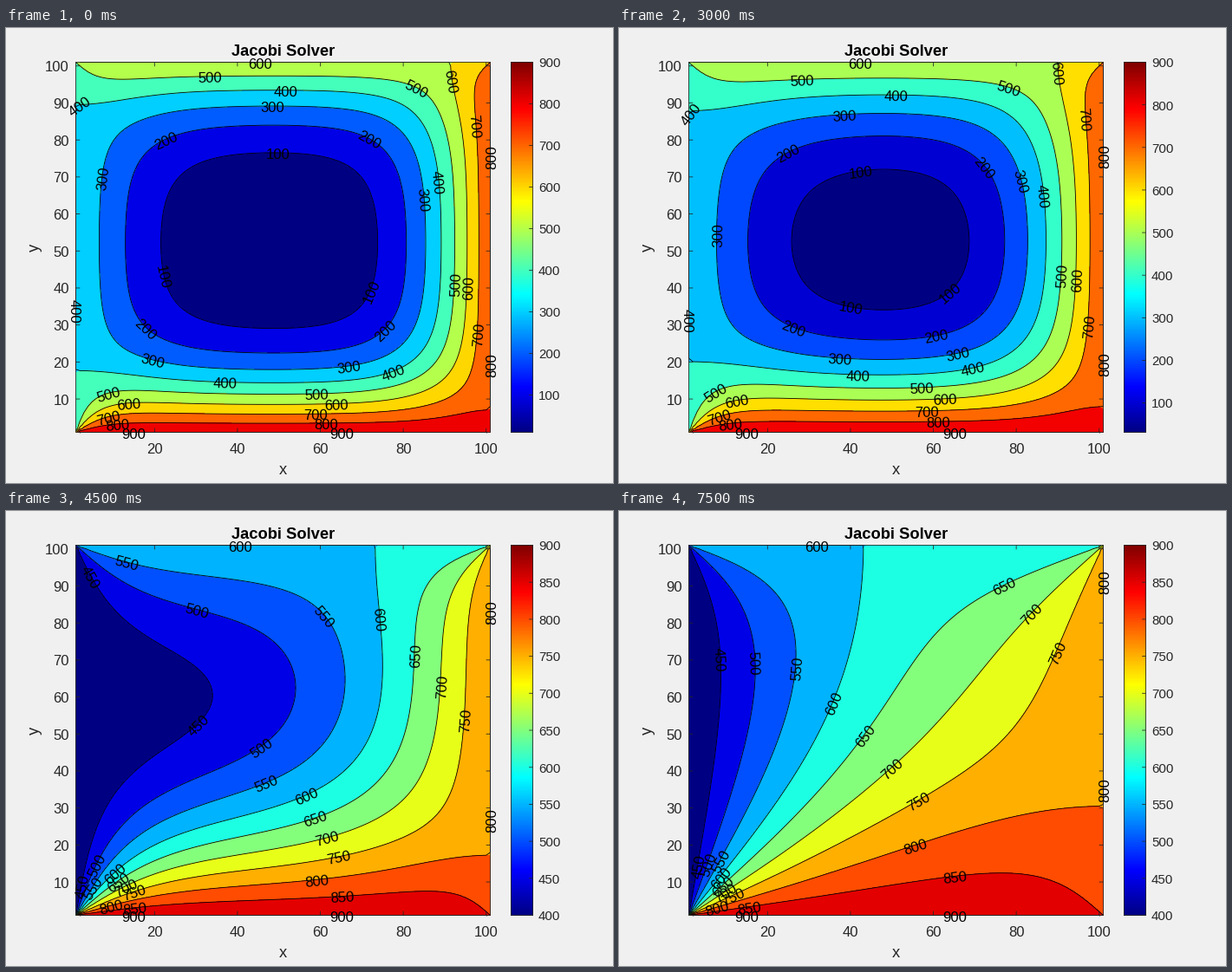
Write a matplotlib script that moves like this. It is 700x525 px and loops after 8000 ms.

```python
import math

import numpy as np
import matplotlib.pyplot as plt
from matplotlib.animation import FuncAnimation

W, H = 700, 525
LEFT, RIGHT, TOP, BOTTOM = 80.5, 558.5, 39.5, 466.5
BAR_L, BAR_R = 582.5, 607.5
N = 101
DX, DY = (RIGHT - LEFT) / (N - 1), (BOTTOM - TOP) / (N - 1)
GRAY = "#262626"
PT = 0.72  # points per pixel at 100 dpi
LINE = 0.83 * PT
SPACING, LABEL, SHIFT = 240, 28, 0.195  # contour label layout in pixels

# Jacobi sweeps completed at each displayed step
SWEEPS = [605, 607, 610, 616, 627, 668, 795, 1037, 1800, 3750,
          5800, 7850, 10000, 12200, 14400, 16600]

plt.rcParams["font.family"] = "Liberation Sans"


def px(x):
    return LEFT + (x - 1) * DX


def py(y):
    return BOTTOM - (y - 1) * DY


def solve():
    u = np.zeros((N, N))
    u[:, 0], u[:, -1], u[-1], u[0] = 400, 800, 600, 900
    u[0, 0], u[0, -1], u[-1, 0], u[-1, -1] = 650, 850, 500, 700
    states, done = [], 0
    for target in SWEEPS:
        for _ in range(target - done):
            u[1:-1, 1:-1] = 0.25 * (u[:-2, 1:-1] + u[2:, 1:-1]
                                    + u[1:-1, :-2] + u[1:-1, 2:])
        done = target
        states.append(u.copy())
    return states


def jet(n=256):
    x = np.arange(1, n + 1)[:, None] / n
    return np.clip(1.5 - np.abs(4 * x - np.array([3, 2, 1])), 0, 1)


def nice_step(span):
    base = 10 ** math.floor(math.log10(span))
    ratio = span / base
    if ratio < 1.2:
        return base / 10
    if ratio < 2.4:
        return base / 5
    return base / 2 if ratio < 6 else base


STATES = solve()
JET = jet()
GX, GY = np.meshgrid(px(np.arange(1, N + 1)), py(np.arange(1, N + 1)))

fig = plt.figure(figsize=(W / 100, H / 100), dpi=100, facecolor="#f0f0f0")
ax = fig.add_axes([0, 0, 1, 1])


def write(x, y, s, size, angle=0, ha="center", color=GRAY, mid=0.358, **kw):
    """Place text so that a point mid * size above its baseline is at (x, y)."""
    a, drop = math.radians(angle), mid * size
    ax.text(x + drop * math.sin(a), y + drop * math.cos(a), s,
            fontsize=size * PT, rotation=angle, rotation_mode="anchor",
            ha=ha, va="baseline", color=color, zorder=6, **kw)


def stroke(xs, ys):
    ax.plot(xs, ys, color=GRAY, lw=LINE, zorder=4, snap=False,
            solid_capstyle="butt", solid_joinstyle="miter")


def frame_box(x0, x1):
    stroke([x0, x1, x1, x0, x0], [TOP, TOP, BOTTOM, BOTTOM, TOP])


def oriented(seg):
    """Start open lines at lower left; run rings counterclockwise from below."""
    if not np.allclose(seg[0], seg[-1]):
        key = seg[:, 0] - seg[:, 1]
        return seg if key[0] <= key[-1] else seg[::-1]
    ring = seg[:-1]
    x, y = ring[:, 0], -ring[:, 1]
    if np.sum(x * np.roll(y, -1) - y * np.roll(x, -1)) < 0:
        ring = ring[::-1]
    row = (BOTTOM - ring[:, 1]) / DY
    on_row = np.flatnonzero(np.abs(row - np.round(row)) < 1e-6)
    if len(on_row):
        low = row[on_row].min()
        first = on_row[row[on_row] < low + 0.5]
        ring = np.roll(ring, -first[np.argmax(ring[first, 0])], axis=0)
    return np.vstack([ring, ring[:1]])


def upright(angle):
    if abs(angle) > 90.5:
        angle -= math.copysign(180, angle)
    return angle


def label_line(seg, value):
    seg = oriented(seg)
    dist = np.r_[0, np.cumsum(np.hypot(*np.diff(seg, axis=0).T))]
    room = dist[-1] - 2 * LABEL
    if room <= 0:
        return

    def at(s):
        return [np.interp(s, dist, seg[:, k]) for k in (0, 1)]

    for s in np.arange(LABEL + SHIFT * (room % SPACING), dist[-1] - LABEL, SPACING):
        (x0, y0), (x1, y1), (x, y) = at(s - 10), at(s + 10), at(s)
        angle = upright(math.degrees(math.atan2(y0 - y1, x1 - x0)))
        write(x, y, f"{value:g}", 16.67, angle, color="black", mid=0.42)


def draw_field(u, lo, hi, levels):
    starts = [lo] + [v for v in levels if v > lo]
    bands = [JET[min(255, int((v - lo) / (hi - lo) * 256))] for v in starts]
    ax.contourf(GX, GY, u, [lo - 1] + starts[1:] + [hi + 1],
                colors=bands, zorder=1)
    # Lift the walls slightly so lines can follow them
    z = u.copy()
    z[[0, -1]] += 1e-6
    z[1:-1, [0, -1]] += 1e-6
    lines = ax.contour(GX, GY, z, starts[1:], colors="black",
                       linewidths=LINE, zorder=3)
    for value, segs in zip(starts[1:], lines.allsegs):
        for seg in segs:
            if len(seg) > 2:
                label_line(seg, value)


def draw_axes():
    frame_box(LEFT, RIGHT)
    for v in range(20, 101, 20):
        x = px(v)
        stroke([x, x], [BOTTOM, BOTTOM - 4.8])
        stroke([x, x], [TOP, TOP + 4.8])
        write(x, 485.5, str(v), 16.67)
    for v in range(10, 101, 10):
        y = py(v)
        stroke([LEFT, LEFT + 4.8], [y, y])
        stroke([RIGHT, RIGHT - 4.8], [y, y])
        write(73, y + 0.5, str(v), 16.67, ha="right")
    write(319.5, 508.5, "x", 18.33)
    write(31, 253, "y", 18.33, 90)
    write(319.5, 25, "Jacobi Solver", 18.33, color="black", weight="bold")


def draw_bar(lo, hi, levels):
    ax.imshow(JET[::-1, None], extent=(582, 608, 467, 39),
              aspect="auto", interpolation="nearest", zorder=1)
    frame_box(BAR_L, BAR_R)
    for v in levels:
        y = BOTTOM - (v - lo) / (hi - lo) * (BOTTOM - TOP)
        stroke([BAR_R, BAR_R - 4.3], [y, y])
        write(614, y + 0.5, f"{v:g}", 15, ha="left")


def draw(i):
    ax.clear()
    u = STATES[i]
    lo, hi = u.min(), u.max()
    step = nice_step(hi - lo)
    levels = list(np.arange(math.ceil(lo / step) * step, hi + step / 2, step))
    draw_field(u, lo, hi, levels)
    draw_axes()
    draw_bar(lo, hi, levels)
    ax.set_xlim(0, W)
    ax.set_ylim(H, 0)
    ax.axis("off")
    return []


anim = FuncAnimation(fig, draw, frames=len(STATES), init_func=lambda: [],
                     interval=500, repeat=True, repeat_delay=0)
plt.show()
```
